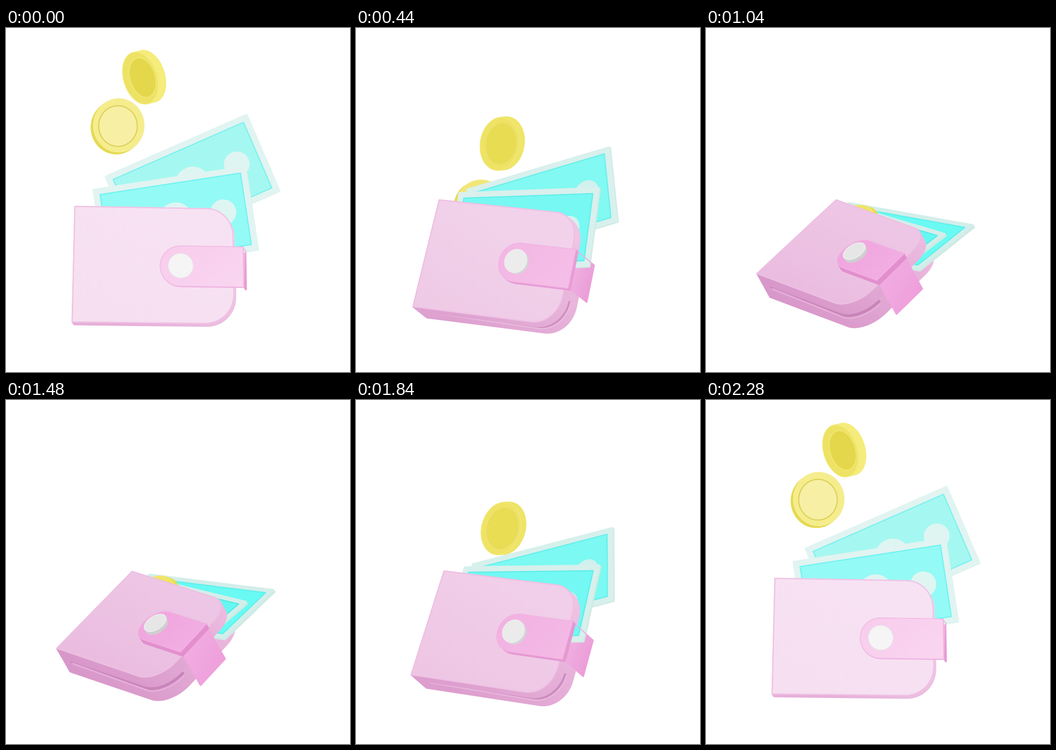
An HTML page that plays this animation: 748x748 px, repeating every 2320 ms.

```html
<!DOCTYPE html>
<html lang="en">
<head>
<meta charset="utf-8">
<title>Wallet</title>
<style>
html, body { margin: 0; width: 100%; height: 100%; overflow: hidden; background: #fff; }
svg { display: block; width: 100%; height: 100%; }
</style>
</head>
<body>
<svg id="stage" viewBox="0 0 748 748" stroke-linejoin="round" stroke-linecap="round"><defs></defs></svg>
<script>
const LOOP = 2320, STEP = 40;
const stage = document.getElementById('stage');
const defs = stage.querySelector('defs');

function make(tag, attrs, parent = stage) {
  const el = document.createElementNS('http://www.w3.org/2000/svg', tag);
  for (const k in attrs) el.setAttribute(k, attrs[k]);
  return parent.appendChild(el);
}

const clamp = x => Math.max(0, Math.min(1, x));
const smooth = x => (x = clamp(x), x * x * (3 - 2 * x));
const lerp = (a, b, k) => a + (b - a) * k;
const rgb = hex => [1, 3, 5].map(i => parseInt(hex.slice(i, i + 2), 16));
const mix = (a, b, k) => {
  const to = rgb(b);
  return `rgb(${rgb(a).map((c, i) => Math.round(lerp(c, to[i], k)))})`;
};

// Key poses along the turn: cover corners (TL TR BR BL), depth vector,
// then TL TR BR of the front and the back note.
const KNOTS = [0, .298, .731, 1];
const POSES = [
  [150,388, 493,394, 496,643, 144,639, 4,6, 188,350, 522,299, 550,483, 214,322, 524,186, 597,355],
  [181,374, 485,406, 436,646, 124,606, 30,24, 223,357, 530,346, 507,519, 240,350, 552,257, 569,421],
  [242,370, 490,424, 363,624, 111,562, 33,46, 283,381, 531,407, 437,537, 300,373, 581,358, 512,490],
  [283,374, 487,447, 318,612, 111,534, 28,51, 300,381, 522,447, 400,540, 310,379, 584,428, 463,525]
];

function poseAt(q) {
  const weights = KNOTS.map((a, i) =>
    KNOTS.reduce((w, b, j) => j === i ? w : w * (q - b) / (a - b), 1));
  const v = POSES[0].map((_, n) => weights.reduce((s, w, i) => s + w * POSES[i][n], 0));
  return Array.from({ length: v.length / 2 }, (_, i) => [v[2 * i], v[2 * i + 1]]);
}

const line = (pts, closed = true) =>
  'M' + pts.map(p => p[0].toFixed(2) + ' ' + p[1].toFixed(2)).join('L') + (closed ? 'Z' : '');

function arc(cx, cy, rx, ry, from, to, n = 14) {
  return Array.from({ length: n + 1 }, (_, i) => {
    const a = lerp(from, to, i / n) * Math.PI / 180;
    return [cx + rx * Math.cos(a), cy + ry * Math.sin(a)];
  });
}
const disc = (cx, cy, rx, ry) => arc(cx, cy, rx, ry, 0, 360, 40);

// Outlines in cover units: u to the right, v down.
const LOWER_CORNER = arc(.82, .74, .18, .26, 90, 0);
const COVER = [[0, 0], ...arc(.84, .235, .16, .235, -90, 0), ...LOWER_CORNER.slice().reverse(), [0, 1]];
const GROOVE = [[.07, .985], ...LOWER_CORNER];
const strapShape = end => [[end, .335], ...arc(.67, .51, .125, .175, 270, 90), [end, .685]];
const BUTTON = disc(.675, .51, .077, .106);

function gradient(id, x1, y1, x2, y2) {
  const g = make('linearGradient', { id, x1, y1, x2, y2 }, defs);
  const stops = [0, 1].map(offset => make('stop', { offset }, g));
  return (a, b) => [a, b].forEach((c, i) => stops[i].setAttribute('stop-color', c));
}
const tintFace = gradient('face', .1, 1, .7, .2);
const tintEdge = gradient('edge', .35, 1, 1, .3);
const tintStrap = gradient('strap', 0, .2, 1, .8);
const tintFlap = gradient('flap', .1, .2, .9, .7);

const shape = (fill = 'none', stroke = 'none', width = 0, parent = stage) =>
  make('path', { fill, stroke, 'stroke-width': width }, parent);
function put(el, d, fill, stroke) {
  el.setAttribute('d', d);
  if (fill) el.setAttribute('fill', fill);
  if (stroke) el.setAttribute('stroke', stroke);
}

const makeCoin = () => ({ body: shape(), face: shape('none', 'none', 1.5), inner: shape('none', 'none', 2.5) });
function makeNote(id) {
  const g = make('g', { id });
  return {
    side: shape('#cfeae5', '#cfeae5', 4, g), paper: shape('none', 'none', 4, g),
    ink: shape('none', 'none', 2.5, g), marks: shape('none', 'none', 0, g)
  };
}

const backCover = shape('url(#edge)', 'url(#edge)', 3);
const groove = shape(), grooveLight = shape();
const lowCoin = makeCoin();
const backNote = makeNote('backNote'), frontNote = makeNote('frontNote');
const highCoin = makeCoin();
const coverEdge = shape('url(#edge)', 'url(#edge)', 3);
const coverFace = shape('url(#face)', 'none', 2.5);
const flap = shape('url(#flap)', 'url(#flap)', 4);
const flapClip = make('path', {}, make('clipPath', { id: 'flapArea' }, defs));
const noteOverFlap = make('use', { href: '#frontNote', 'clip-path': 'url(#flapArea)' });
const strapEdge = shape('none', 'none', 2);
const strapFace = shape('url(#strap)', 'none', 1.5);
const buttonEdge = shape(), buttonFace = shape('none', 'none', 1.5);

function drawNote(note, [tl, tr, br], depth, paper, ink, rim, mark) {
  const at = ([u, v]) => [0, 1].map(i => tl[i] + u * (tr[i] - tl[i]) + v * (br[i] - tr[i]));
  const box = (a, b) => [[a, b], [1 - a, b], [1 - a, 1 - b], [a, 1 - b]].map(at);
  const quad = box(.006, .011);
  put(note.side, line(quad.map(p => [p[0] + depth[0] * .08, p[1] + depth[1] * .08])));
  put(note.paper, line(quad), paper, paper);
  put(note.ink, line(box(.043, .078)), ink, rim);
  put(note.marks, [[.19, .083, .15], [.5, .112, .2], [.81, .083, .15]]
    .map(([u, ru, rv]) => line(disc(u, .5, ru, rv).map(at))).join(''), mark);
}

function drawCoin(coin, c, colors) {
  const a = c.turn * Math.PI / 180, cos = Math.cos(a), sin = Math.sin(a);
  const ring = (k, size) => line(disc(0, 0, c.rx * size, c.ry * size).map(([x, y]) =>
    [c.x + c.dx * k + x * cos - y * sin, c.y + c.dy * k + x * sin + y * cos]));
  let body = '';
  for (let k = 0; k <= 1.001; k += .1) body += ring(k, 1);
  put(coin.body, body, colors[0]);
  put(coin.face, ring(0, .98), colors[1], colors[4]);
  put(coin.inner, ring(.3, .75), colors[2], colors[3]);
}

function render(time) {
  const t = Math.floor((time % LOOP) / STEP) * STEP;
  // The way back mirrors the way in, with a slightly quicker start.
  let u = t;
  if (t >= 1360) { u = (LOOP - t) * 1.03; u += 51 * smooth((u - 620) / 370); }
  const q = smooth((u - 100) / 940);
  const shade = 1 - (1 - q) ** 2.5;
  const tone = (a, b) => mix(a, b, shade);

  const pose = poseAt(q);
  const [tl, tr, br, bl, depth] = pose;
  const at = w => ([x, y]) => [0, 1].map(i =>
    lerp(lerp(tl[i], tr[i], x), lerp(bl[i], br[i], x), y) + w * depth[i]);
  const plane = (pts, w, closed) => line(pts.map(at(w)), closed);
  const stack = (pts, from, to, n = 18) => {
    let d = '';
    for (let i = 0; i <= n; i++) d += plane(pts, lerp(from, to, i / n));
    return d;
  };
  const thick = Math.hypot(...depth);

  tintEdge(tone('#e7afd9', '#d897c9'), tone('#f2cfe9', '#edbde1'));
  tintFace(tone('#f5dff0', '#e9bade'), tone('#f7e2f3', '#eec6e5'));
  tintStrap(tone('#f8cdec', '#efa5de'), tone('#f9d5f0', '#f2afe2'));
  tintFlap(tone('#f3bde5', '#f2aee2'), tone('#e59ad2', '#ee9fdb'));

  put(backCover, stack(COVER, 1, .4));
  put(groove, plane(GROOVE, .5, false), null, tone('#dd9dce', '#c985ba'));
  groove.setAttribute('stroke-width', thick * .11);
  put(grooveLight, plane(GROOVE, .6, false), null, tone('#f4d3ec', '#e5aed8'));
  grooveLight.setAttribute('stroke-width', thick * .06);

  const paper = tone('#e1f4f1', '#d3eeea'), mark = tone('#dff5f2', '#c9eeeb');
  drawNote(backNote, pose.slice(8, 11), depth, paper, tone('#a5f8f1', '#69faf3'), tone('#7cf1ed', '#5ef0ea'), mark);
  drawNote(frontNote, pose.slice(5, 8), depth, paper, tone('#94faf6', '#65f7f1'), tone('#70f3f1', '#56ece7'), mark);

  drawCoin(lowCoin, {
    x: 245 + 90 * q,
    y: 212 + 168 * smooth(u / 475) + 55 * smooth((u - 400) / 200),
    rx: 56 - 10 * q, ry: 59 - 18 * q, dx: -5 - 4 * q, dy: 4, turn: 20 * q
  }, [tone('#e6da53', '#e8dc52'), tone('#f5ec8c', '#efe468'), tone('#f7efa4', '#efe56e'), tone('#ddd05e', '#dccf48'), tone('#f7ef9d', '#f4eb80')]);

  const p = smooth(u / 950);
  drawCoin(highCoin, {
    x: 292 + 48 * p - 26 * p ** 4, y: 109 + 321 * p,
    rx: 37 + 24 * p * (1 - p), ry: 59,
    dx: 17 - 16 * p + 8 * p * p, dy: -4 + 7 * p, turn: -17 + 72 * p ** 1.25
  }, [mix('#f5ec7c', '#e8dd54', p), mix('#ede264', '#efe465', p), mix('#e4d74b', '#ede25c', p), mix('#f0e670', '#ddd04a', p), '#f2e878']);

  put(coverEdge, stack(COVER, .4, 0));
  put(coverFace, plane(COVER, 0), null, tone('#f0c3e5', '#edc0e3'));

  // The note pokes through the strap's fold until the wallet has turned far enough.
  const end = 1.065 - .025 * q;
  const flapPath = line([
    ...[[end, .345], [end, .675]].map(at(-.28)),
    ...[[end, .675], [end, .345]].map(at(1 + .18 * q))
  ]);
  put(flap, flapPath);
  put(flapClip, flapPath);
  noteOverFlap.setAttribute('visibility', q > .62 ? 'hidden' : 'visible');

  const strap = strapShape(end);
  put(strapEdge, stack(strap, -.1, -.28, 8), tone('#eeb0df', '#e28fce'), tone('#eeb0df', '#e28fce'));
  put(strapFace, plane(strap, -.28), null, tone('#f3bbe5', '#f2b2e4'));
  put(buttonEdge, stack(BUTTON, -.28, -.42, 8), tone('#dedede', '#cfcfcf'));
  put(buttonFace, plane(BUTTON, -.42), tone('#f5f5f5', '#e6e6e6'), tone('#ebebeb', '#f0f0f0'));
}

const start = performance.now();
function tick() {
  render(performance.now() - start);
  requestAnimationFrame(tick);
}
tick();
</script>
</body>
</html>
```
